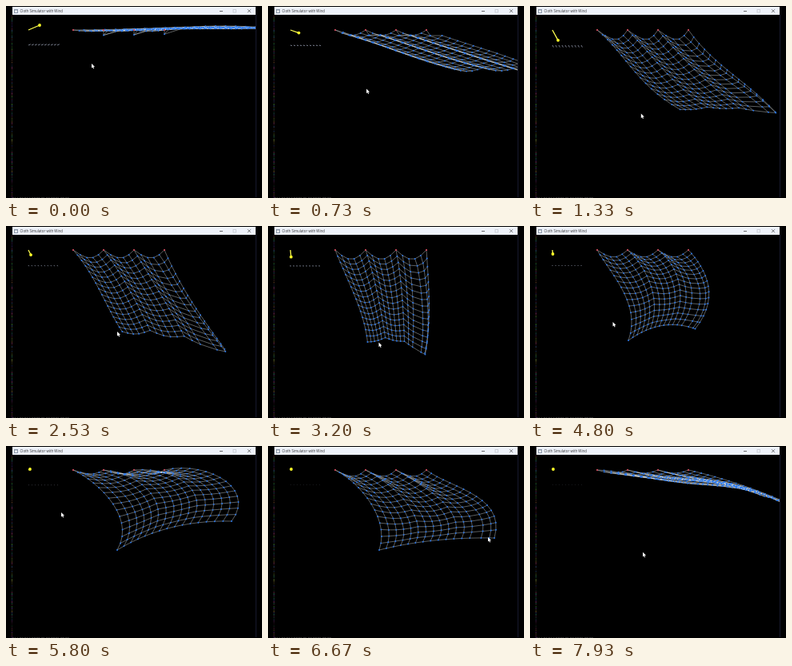
Write an HTML page with a canvas that moves like this. It is 320 px wide and 240 px high and loops after 8 s.

```html
<!DOCTYPE html>
<html lang="en">
<head>
<meta charset="utf-8">
<title>Cloth Simulator with Wind</title>
<style>
  html, body { margin: 0; width: 100%; height: 100%; overflow: hidden; background: #000; }
  canvas { display: block; width: 100vw; height: 100vh; }
</style>
</head>
<body>
<canvas id="stage" width="320" height="240"></canvas>
<script>
const ctx = document.getElementById('stage').getContext('2d');
const LOOP = 8000, STEP = 200 / 3;
const COLS = 16, ROWS = 16;
const PIN_X = 84, PIN_Y = 30, PIN_GAP = 38;

// left, mid and right: cloth columns at one third, two thirds and full depth.
// sag: scallop offset between pins; hem: share of it left at the bottom.
// fold: bunching of the last columns; dip: drop just below the pins.
const poses = [
  { time: 0, wind: [14, -6], mouse: [107, 72], sag: [0, 1.5], hem: 1, fold: 0, dip: 7,
    left: [150, 29, 215, 28, 280, 28], mid: [205, 27, 270, 26, 335, 27], right: [262, 25, 325, 27, 390, 32] },
  { time: 1330, wind: [7, 13], mouse: [139, 135], sag: [4, 12], hem: .15, fold: .4, dip: 0,
    left: [114, 62, 144, 97, 187, 130], mid: [172, 65, 205, 99, 240, 127], right: [232, 68, 268, 98, 306, 133] },
  { time: 2530, wind: [3, 6], mouse: [139, 132], sag: [2, 10], hem: .5, fold: .4, dip: 0,
    left: [108, 64, 127, 100, 145, 132], mid: [163, 64, 183, 99, 200, 133], right: [222, 78, 248, 119, 273, 154] },
  { time: 3800, wind: [-1, 11], mouse: [138, 157], sag: [0, 13], hem: 0, fold: .4, dip: 0,
    left: [94, 72, 106, 112, 107, 156], mid: [137, 69, 130, 110, 123, 147], right: [183, 80, 161, 123, 131, 163] },
  { time: 5800, wind: [2, -1], mouse: [69, 83], sag: [3, 5], hem: 0, fold: 0, dip: 0,
    left: [116, 52, 142, 88, 139, 130], mid: [186, 40, 212, 66, 206, 102], right: [250, 32, 286, 56, 282, 94] },
  { time: 6670, wind: [1, -1], mouse: [275, 114], sag: [3, 8], hem: 0, fold: .15, dip: 0,
    left: [113, 52, 137, 88, 139, 130], mid: [178, 54, 206, 85, 208, 118], right: [236, 50, 274, 74, 283, 115] },
  { time: 7930, wind: [1, -1], mouse: [140, 133], sag: [2, 4], hem: .4, fold: 0, dip: 0,
    left: [130, 36, 185, 45, 250, 47], mid: [190, 39, 235, 44, 290, 60], right: [240, 41, 285, 56, 330, 75] }
];

function mix(a, b, k) {
  return Array.isArray(a) ? a.map((value, i) => mix(value, b[i], k)) : a + (b - a) * k;
}

function poseAt(time) {
  const next = poses.findIndex(p => p.time > time);
  if (next < 0) return poses[poses.length - 1];
  const a = poses[next - 1], b = poses[next];
  const s = (time - a.time) / (b.time - a.time);
  const k = s * s * (3 - 2 * s);
  return Object.fromEntries(Object.keys(a).map(key => [key, mix(a[key], b[key], k)]));
}

// Smooth curve through evenly spaced values.
function through(values, s) {
  const n = values.length - 1;
  return values.reduce((sum, value, i) => {
    let weight = 1;
    for (let j = 0; j <= n; j++) if (j !== i) weight *= (s * n - j) / (i - j);
    return sum + value * weight;
  }, 0);
}

function clothPoint(pose, col, row) {
  const v = row / (ROWS - 1);
  let u = col / (COLS - 1);
  if (u > .8) {
    const w = (u - .8) * 5;
    u += pose.fold * Math.sin(Math.PI * w) * Math.sqrt(v) / 5;
  }
  const scallop = Math.abs(Math.sin(Math.PI * col / 5)) * (1 - v + v * pose.hem);
  const point = [0, 1].map(axis => {
    const columns = [pose.left, pose.mid, pose.right].map((side, i) => {
      const top = axis ? PIN_Y : PIN_X + i * PIN_GAP * 1.5;
      return through([top, side[axis], side[axis + 2], side[axis + 4]], v);
    });
    return through(columns, u) + pose.sag[axis] * scallop;
  });
  if (row === 1 && col % 5 === 0 && col > 0) {
    const pull = pose.dip / 7;
    point[0] = mix(point[0], PIN_X + col / 5 * PIN_GAP, pull);
    point[1] += pose.dip;
  }
  return point;
}

function line(points, color, width) {
  ctx.strokeStyle = color;
  ctx.lineWidth = width;
  ctx.beginPath();
  points.forEach(([x, y]) => ctx.lineTo(x, y));
  ctx.stroke();
}

function dot([x, y], radius, color) {
  ctx.fillStyle = color;
  ctx.beginPath();
  ctx.arc(x, y, radius, 0, 2 * Math.PI);
  ctx.fill();
}

function drawWindow() {
  ctx.fillStyle = '#000';
  ctx.fillRect(0, 0, 320, 240);
  let seed = 7;
  const random = () => (seed = seed * 16807 % 2147483647) / 2147483647;
  for (let y = 12; y < 239; y += 2) {
    ctx.fillStyle = `hsl(${random() * 360} 45% ${8 + random() * 18}%)`;
    ctx.fillRect(7, y, 1, 1 + random());
  }
  ctx.fillStyle = '#16182e';
  ctx.fillRect(312, 11, 1, 228);
  ctx.fillStyle = '#303030';
  for (let x = 8; x < 78; x += 3) ctx.fillRect(x, 239, 1 + random() * 2, 1);

  ctx.fillStyle = '#eef2fa';
  ctx.fillRect(8, 1, 304, 10);
  ctx.fillStyle = '#8b98a8';
  ctx.fillRect(10, 4, 5, 5);
  ctx.fillStyle = '#fff';
  ctx.fillRect(11, 5.5, 3, 2.5);
  ctx.fillStyle = '#333';
  ctx.font = '4.4px "Open Sans", sans-serif';
  ctx.fillText('Cloth Simulator with Wind', 17.5, 7.8);
  line([[267, 6.5], [271, 6.5]], '#444', .8);
  ctx.strokeStyle = '#c4c8d0';
  ctx.strokeRect(284, 4.5, 3.5, 3.5);
  line([[302, 4.2], [306, 8.2]], '#444', .7);
  line([[306, 4.2], [302, 8.2]], '#444', .7);
}

function drawWind([dx, dy]) {
  const tip = [28 + dx, 30 + dy];
  line([[28, 30], tip], '#ffff50', 1.3);
  dot(tip, 1.9, '#ffff28');
  for (let x = 28; x < 66; x += 4) {
    line([[x, 49], [x + dx * .2, 49 + dy * .2]], '#a9b0c8', .7);
  }
}

function drawCloth(pose) {
  const grid = Array.from({ length: ROWS }, (_, row) =>
    Array.from({ length: COLS }, (_, col) => clothPoint(pose, col, row)));
  const thread = 'rgba(218, 224, 226, .65)';
  grid.forEach(row => line(row, thread, .65));
  grid[0].forEach((_, col) => line(grid.map(row => row[col]), thread, .65));
  grid.flat().forEach(point => dot(point, .95, '#2878f0'));
  for (let col = 0; col < COLS; col += 5) dot(grid[0][col], 1.1, '#e04040');
}

function drawMouse([x, y]) {
  ctx.fillStyle = '#fff';
  ctx.beginPath();
  [[0, 0], [0, 5.6], [1.3, 4.5], [2.2, 6.5], [3.1, 6.1], [2.3, 4.2], [4, 4]]
    .forEach(([px, py]) => ctx.lineTo(x + px, y + py));
  ctx.fill();
}

function draw(now) {
  const time = Math.floor(now % LOOP / STEP + .01) * STEP;
  const pose = poseAt(time);
  drawWindow();
  ctx.save();
  ctx.beginPath();
  ctx.rect(8, 11, 304, 229);
  ctx.clip();
  drawWind(pose.wind);
  drawCloth(pose);
  drawMouse(pose.mouse);
  ctx.restore();
  requestAnimationFrame(draw);
}
requestAnimationFrame(draw);
</script>
</body>
</html>
```
